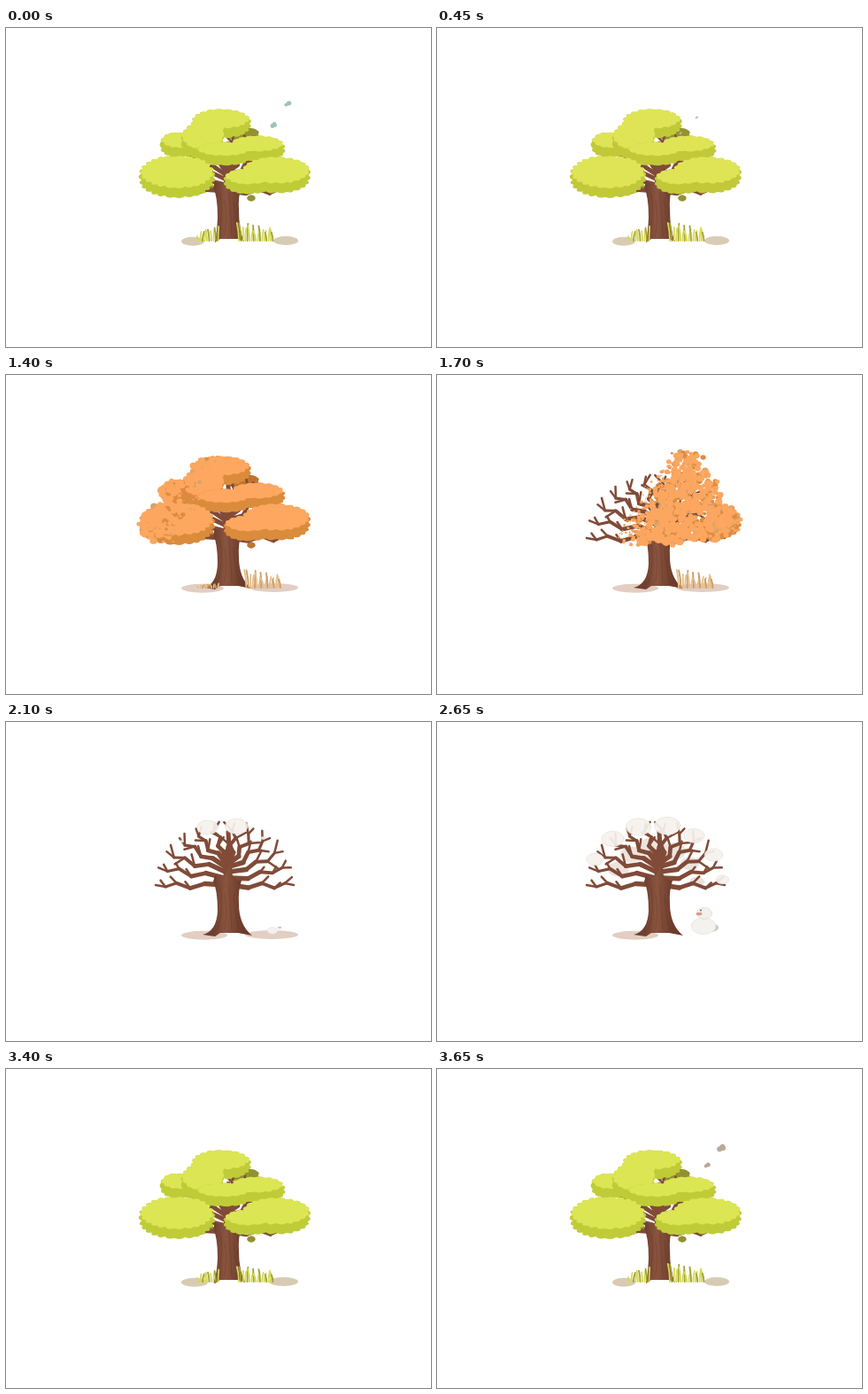
An HTML page with a canvas that plays this animation: 480 by 360 pixels, repeating every 3.7 s.

```html
<!DOCTYPE html>
<html lang="en">
<head>
<meta charset="utf-8">
<title>Tree through the seasons</title>
<style>
html, body { margin: 0; width: 100%; height: 100%; overflow: hidden; background: #fff; }
canvas { display: block; }
</style>
</head>
<body>
<canvas id="stage" width="480" height="360"></canvas>
<script>
const ctx = document.getElementById('stage').getContext('2d');
const LOOP = 3700, STEP = 50;

const clamp = v => Math.max(0, Math.min(1, v));
const ramp = (t, a, b) => clamp((t - a) / (b - a));
const ease = k => k * k * (3 - 2 * k);
const pulse = (t, a, b, c, d) => ease(ramp(t, a, b)) * (1 - ease(ramp(t, c, d)));
const mix = (a, b, k) => a + (b - a) * k;

function randomizer(seed) {
  return () => (seed = (seed * 16807) % 2147483647) / 2147483647;
}

// Spring, gold and autumn colours of each part
const COLORS = {
  light: [[220, 229, 83], [234, 225, 98], [253, 167, 96]],
  shade: [[191, 204, 56], [203, 190, 60], [219, 139, 60]],
  back: [[146, 145, 48], [169, 151, 51], [190, 116, 49]],
  grass: [[213, 218, 83], [231, 219, 91], [228, 190, 140]],
  stalk: [[162, 159, 57], [198, 180, 64], [205, 155, 98]],
  ground: [[216, 203, 180], [224, 208, 186], [226, 206, 195]]
};

function color(t, part) {
  const season = (ramp(t, 350, 900) + ramp(t, 900, 1250)) * (1 - ramp(t, 2800, 3090));
  const i = Math.min(1, Math.floor(season));
  const [a, b] = COLORS[part].slice(i);
  return `rgb(${a.map((v, j) => Math.round(mix(v, b[j], season - i))).join()})`;
}

function oval(x, y, rx, ry, fill, line) {
  ctx.beginPath();
  ctx.ellipse(x, y, Math.max(0, rx), Math.max(0, ry), 0, 0, 7);
  ctx.fillStyle = fill;
  ctx.fill();
  if (line) {
    ctx.strokeStyle = line;
    ctx.lineWidth = 0.7;
    ctx.stroke();
  }
}

function scaled(x, y, sx, sy, draw) {
  if (sx <= 0 || sy <= 0) return;
  ctx.save();
  ctx.translate(x, y);
  ctx.scale(sx, sy);
  ctx.translate(-x, -y);
  draw();
  ctx.restore();
}

// Rounded puff with a scalloped rim
const rimRnd = randomizer(23);
function puff(path, x, y, rx, ry) {
  const n = Math.round((rx + ry) * 0.42);
  const wobble = Array.from({ length: n }, () => 0.93 + rimRnd() * 0.06);
  const at = (i, r) => {
    const a = i / n * Math.PI * 2, c = Math.cos(a), s = Math.sin(a);
    return [x + rx * r * Math.sign(c) * Math.abs(c) ** 0.85, y + ry * r * Math.sign(s) * Math.abs(s) ** 0.85];
  };
  path.moveTo(...at(0, wobble[0]));
  for (let i = 0; i < n; i++) {
    path.quadraticCurveTo(...at(i + 0.5, 1.11), ...at(i + 1, wobble[(i + 1) % n]));
  }
  path.closePath();
}

function clump(start, ...puffs) {
  const shape = new Path2D();
  puffs.forEach(p => puff(shape, ...p));
  return { start, x: puffs[0][0], y: puffs[0][1], shape };
}

const backLeaves = clump(3100, [268, 120, 18, 8], [227, 180, 8, 4], [277, 192, 5, 4]);
const clumps = [
  clump(3140, [195, 132, 21, 14]),
  clump(3100, [243, 108, 33, 16], [222, 127, 24, 20]),
  clump(3130, [284, 136, 31, 14], [246, 142, 32, 13]),
  clump(3200, [193, 168, 42, 23]),
  clump(3150, [305, 166, 38, 20], [274, 173, 28, 14])
];

// Boughs fan out so that their tips lie on a dome
const ROOT = [250, 184], DOME = [78, 70];
const dome = (angle, r = 1) =>
  [ROOT[0] - 3 + DOME[0] * r * Math.cos(angle), ROOT[1] - DOME[1] * r * Math.sin(angle)];

function limb(points, from, to) {
  for (let i = 1; i < points.length; i++) {
    ctx.lineWidth = mix(from, to, (i - 1) / Math.max(1, points.length - 2));
    ctx.beginPath();
    ctx.moveTo(...points[i - 1]);
    ctx.lineTo(...points[i]);
    ctx.stroke();
  }
}

const boughRnd = randomizer(7);
const boughs = Array.from({ length: 12 }, (_, i) => {
  const angle = Math.PI * (1 - i / 11), rise = Math.sin(angle), side = i < 6 ? 1 : -1;
  const [tx, ty] = dome(angle);
  const sx = ROOT[0] - side * 3, sy = ROOT[1] - 28 * rise;
  const cx = mix(sx, tx, 0.6), cy = mix(sy, ty, 0.42);
  const heading = Math.atan2(ty - sy, tx - sx);
  const points = [0, 0.25, 0.45, 0.65, 0.83, 1].map((u, j) => {
    const bend = j % 5 ? (j % 2 ? 1 : -1) * (1.5 + boughRnd() * 2.2) : 0;
    return [
      mix(mix(sx, cx, u), mix(cx, tx, u), u) - Math.sin(heading) * bend,
      mix(mix(sy, cy, u), mix(cy, ty, u), u) + Math.cos(heading) * bend
    ];
  });
  const twigs = [2, 3, 4].map(j => {
    const turn = j === 3 && rise > 0.3 ? -1 : 1;
    const a = heading + side * turn * (0.7 + boughRnd() * 0.3);
    const len = (rise < 0.3 ? 7 : 11) + boughRnd() * 4;
    const [x, y] = points[j];
    return [[x, y], [x + Math.cos(a) * len, y + Math.sin(a) * len]];
  });
  return { points, twigs };
});

function drawTree(flare) {
  const reach = 0.9 + 0.1 * flare;
  ctx.lineCap = ctx.lineJoin = 'round';
  ctx.strokeStyle = '#804b38';
  scaled(...ROOT, reach, reach, () => {
    limb([[251, 182], [250, 158], [252, 142], [251, 124]], 10, 5);
    for (const b of boughs) {
      limb(b.points, 5.5, 2.4);
      b.twigs.forEach(w => limb(w, 2.5, 2.5));
    }
  });

  const l = 236 - 14 * flare, r = 269 + 9 * flare;
  const trunk = new Path2D(`M236 173 Q249 181 252 160 Q254 178 266 179 Q262 190 263 205
    Q263 229 ${r} 241 L262 238 L249 238 L242 238 L236 242 L${l} 240 Q238 236 239 213 Q239 190 234 180Z`);
  const bark = ctx.createLinearGradient(236, 0, 266, 0);
  bark.addColorStop(0, '#70402f');
  bark.addColorStop(0.4, '#8a5540');
  bark.addColorStop(1, '#6c3b2a');
  ctx.fillStyle = bark;
  ctx.fill(trunk);
  ctx.lineWidth = 1;
  ctx.strokeStyle = 'rgba(80,40,28,.25)';
  for (let i = 0; i < 4; i++) {
    ctx.beginPath();
    ctx.moveTo(242 + i * 5, 186 + i % 2 * 9);
    ctx.quadraticCurveTo(246 + i * 4, 212, 239 + i * 8, 234);
    ctx.stroke();
  }
}

function drawGround(t, flare) {
  const fill = color(t, 'ground');
  oval(211 + 13 * flare, 240.7, 13 + 13 * flare, 5, fill);
  ctx.globalAlpha = 1 - pulse(t, 2250, 2500, 2800, 3050);
  oval(316 - 16 * flare, 240, 14 + 16 * flare, 5, fill);
  ctx.globalAlpha = 1;
}

const grassRnd = randomizer(41);
const blades = Array.from({ length: 27 }, (_, i) => {
  const left = i < 10;
  return {
    left, dark: i % 3 === 2,
    x: left ? 217 + i * 2.5 : 263 + (i - 10) * 2.4,
    h: left ? 5 + i * 0.9 + grassRnd() * 4 : 21 - (i - 10) * 0.35 - grassRnd() * 8,
    lean: (grassRnd() - 0.6) * 5
  };
});

function drawGrass(t) {
  const back = ease(ramp(t, 3250, 3450));
  const left = Math.max(1 - ramp(t, 1150, 1500), back);
  const right = Math.max(1 - ramp(t, 1800, 2080), back);
  const shift = 10 * pulse(t, 1100, 1500, 2100, 2200);
  ctx.lineWidth = 1.8;
  for (const b of blades) {
    const h = b.h * (b.left ? left : right);
    if (h < 1) continue;
    const x = b.x + (b.left ? 0 : shift);
    ctx.strokeStyle = color(t, b.dark ? 'stalk' : 'grass');
    ctx.beginPath();
    ctx.moveTo(x, 240);
    ctx.quadraticCurveTo(x, 240 - h / 2, x + b.lean, 240 - h);
    ctx.stroke();
  }
}

// The wind reaches each place in turn, from the upper left to the lower right
const BLOW = 1440, RATE = 1.9, SLOPE = 1.1, FLIGHT = 300;
const windAt = (x, y) => BLOW + (x - 150) * RATE - (190 - y) * SLOPE;
const frontAt = (t, y) => 150 + (t - BLOW + (190 - y) * SLOPE) / RATE;
const crownVisible = t => t < 1950 || t > 3090;
const grow = k => k <= 0 ? 0 : 1 + 1.9 * (k - 1) ** 3 + 0.9 * (k - 1) ** 2;

function inCrown(t, draw) {
  if (!crownVisible(t)) return;
  ctx.save();
  if (t < 3000) {
    ctx.beginPath();
    ctx.moveTo(480, 60);
    ctx.lineTo(frontAt(t, 60), 60);
    ctx.lineTo(frontAt(t, 220), 220);
    ctx.lineTo(480, 220);
    ctx.clip();
  }
  draw();
  ctx.restore();
}

function drawClump(t, c, base, top) {
  const s = t > 3000 ? grow(ramp(t, c.start, c.start + 200)) : 1;
  scaled(c.x, c.y, s, s, () => {
    ctx.fillStyle = color(t, base);
    ctx.fill(c.shape);
    if (!top) return;
    ctx.clip(c.shape);
    ctx.translate(0, -11);
    ctx.fillStyle = color(t, top);
    ctx.fill(c.shape);
  });
}

const leafRnd = randomizer(97);
const leaves = [];
while (leaves.length < 1100) {
  const x = 150 + leafRnd() * 195, y = 90 + leafRnd() * 103;
  const inside = Math.hypot((x - 255) / 62, (y - 145) / 46) < 1;
  if (!inside && !clumps.some(c => ctx.isPointInPath(c.shape, x, y))) continue;
  leaves.push({
    x, y, r: 2 + leafRnd() * 2.2, tone: leafRnd(), lift: leafRnd() * 22 - 9,
    start: windAt(x, y) - leafRnd() * 60
  });
}
leaves.sort((a, b) => b.tone - a.tone);

function drawLeaves(t) {
  for (const f of leaves) {
    const k = (t - f.start) / FLIGHT;
    if (k < -0.25 || k >= 1) continue;
    const s = Math.min(1, (k + 0.25) * 6, (1 - k) * 2.5);
    const m = Math.max(0, k);
    const fill = f.tone < 0.65 ? '#fca660' : f.tone < 0.85 ? '#dc8c3f' : '#d9a468';
    oval(f.x + 60 * m ** 1.6, f.y - f.lift * m + Math.sin(m * 6 + f.x) * 2 * m, f.r * s, f.r * s * 0.9, fill);
  }
}

function drawHive(t) {
  const s = pulse(t, 600, 750, 1050, 1200);
  scaled(206, 191, s, s, () => {
    for (let i = 0; i < 5; i++) {
      const w = 9 * Math.sqrt(1 - ((i - 2.2) / 2.9) ** 2);
      oval(206, 193 + i * 4.3, w, 3.2, i % 2 ? '#e9c649' : '#d5ab3a');
    }
    oval(207, 203, 2, 2, '#a97c2b');
  });
}

// Snow settles on the dome from the top outwards
const snowRnd = randomizer(12);
function snowfall(count, size, r, delay) {
  return Array.from({ length: count }, (_, i) => {
    const angle = mix(0.09, 2.7, i / (count - 1)), rise = Math.sin(angle);
    const [x, y] = dome(angle, r);
    const rx = size * (0.8 + 0.7 * rise * rise + snowRnd() * 0.3);
    return { x, y, rx, ry: rx * 0.68, birth: delay + 170 * Math.abs(angle - 1.6) };
  });
}
const caps = snowfall(7, 9, 0.97, 1950);
const drifts = snowfall(6, 10, 0.6, 2130);

function drawSnow(t, list, fill, line) {
  list.forEach((d, i) => {
    const s = pulse(t, d.birth, d.birth + 150, 2760 + i * 15, 2930 + i * 15);
    if (s > 0.01) oval(d.x, d.y + (1 - s) * d.ry * 0.4, d.rx * s, d.ry * s, fill, line);
  });
}

function drawSnowman(t) {
  const melt = ease(ramp(t, 2780, 3080));
  const body = ease(ramp(t, 1980, 2350)), head = ease(ramp(t, 2300, 2450));
  if (!body || t > 3300) return;
  ctx.globalAlpha = 1 - ramp(t, 3080, 3280);
  if (melt > 0.3) oval(299, 239, 17 * melt, 3, '#fafafa');
  ctx.globalAlpha = 1;
  scaled(302, 239, 1, 1 - melt, () => {
    oval(309, 232, 9 * body, 5 * body, '#cfc9c5');
    const r = 3 + 11 * body;
    oval(301, 239 - r * 0.62, r, r * 0.66, '#f4f2ef', '#e5e1dc');
    if (head) {
      oval(302, 216, 8.5 * head, 6.5 * head, '#f3f0eb', '#dcd7ce');
      oval(296, 216.5, 3.5 * head, 1.8 * head, '#d99a89');
      oval(298, 212.5, head, head, '#75675f');
    }
  });
}

function drawButterfly(x, y, size, flap, fill) {
  ctx.save();
  ctx.translate(x, y);
  ctx.rotate(-0.35);
  oval(-size * 0.3, 0, size * 0.55, size * (0.4 + 0.25 * flap), fill);
  oval(size * 0.4, -0.5, size * 0.6, size * (0.55 + 0.2 * flap), fill);
  ctx.restore();
}

function drawButterflies(t) {
  const u = t > 3000 ? t - LOOP : t;
  if (u < -220 || u > 500) return;
  const flap = Math.abs(Math.sin(u / 70));
  const fill = u < 0 ? '#b9aa98' : '#a1c2b9';
  const s = ramp(u, -250, -100) * (1 - ramp(u, 380, 500));
  const near = u < 0 ? 5.5 : 4.6;
  drawButterfly(318 - u * 0.055, 86 - u * 0.065 + u * u * 0.00022, near * s, flap, fill);
  drawButterfly(302 - u * 0.06, 110 + u * 0.02, 4 * s, 1 - flap, fill);
}

function draw(t) {
  ctx.clearRect(0, 0, 480, 360);
  const flare = pulse(t, 1100, 1500, 3250, 3450);
  drawGround(t, flare);
  inCrown(t, () => drawClump(t, backLeaves, 'back'));
  drawSnow(t, drifts, '#ece3dd');
  drawTree(flare);
  drawGrass(t);
  drawHive(t);
  inCrown(t, () => clumps.forEach(c => drawClump(t, c, 'shade', 'light')));
  drawLeaves(t);
  drawSnow(t, caps, 'rgba(245,242,237,.92)', '#e6e0d8');
  drawSnowman(t);
  drawButterflies(t);
}

const begin = performance.now();
function frame() {
  const t = (performance.now() - begin) % LOOP;
  draw(Math.floor(t / STEP) * STEP);
  requestAnimationFrame(frame);
}
frame();
</script>
</body>
</html>
```
